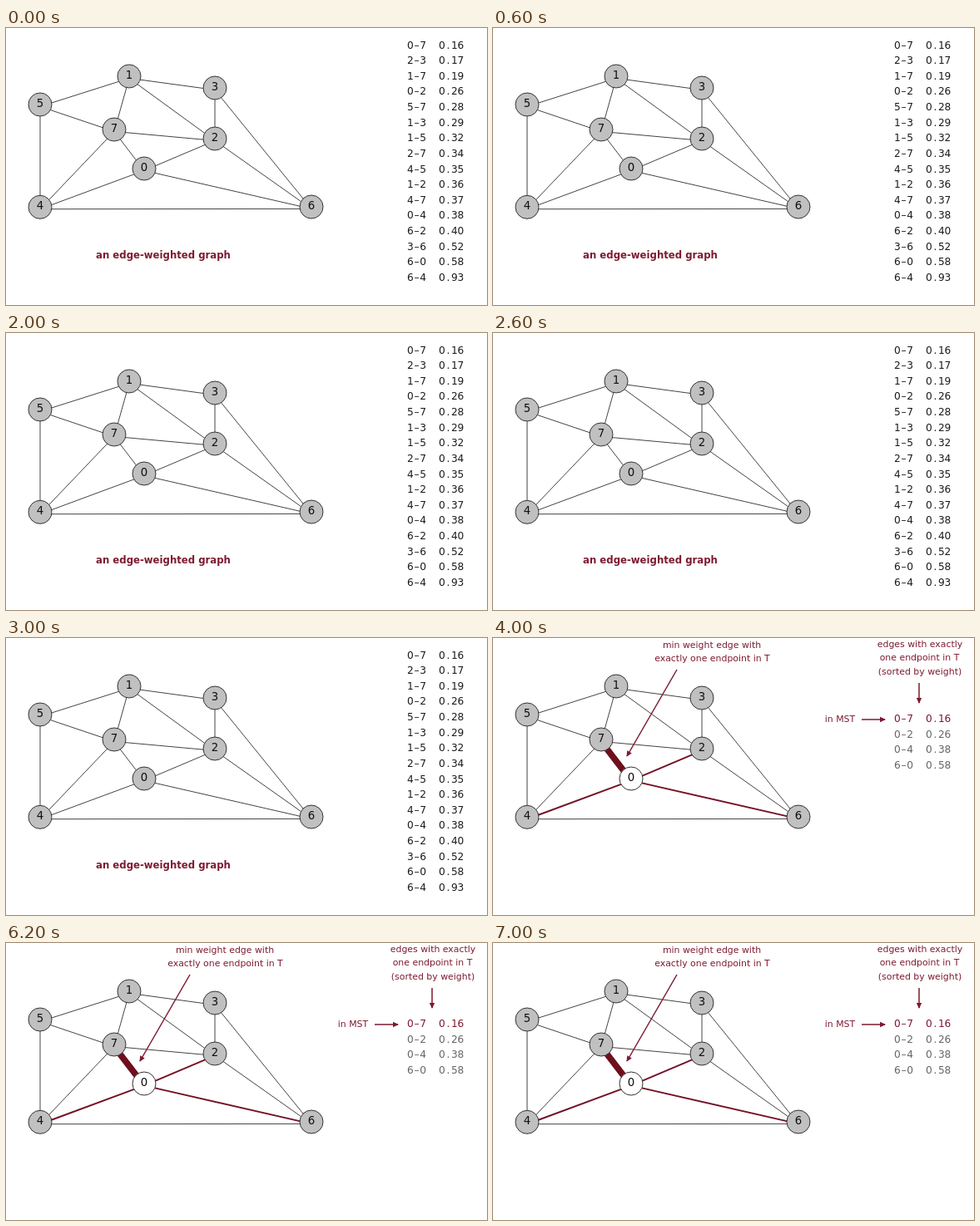
These frames come from a looping animation (578 px wide and 333 px high, 8 s). An HTML page:

```html
<!DOCTYPE html>
<html lang="en">
<head>
<meta charset="utf-8">
<title>Edge-weighted graph</title>
<style>
html, body { margin: 0; width: 100%; height: 100%; overflow: hidden; background: #fff; }
svg { display: block; width: 578px; height: 333px; }
text { font-family: "DejaVu Sans", sans-serif; text-anchor: middle; }
.edge { stroke: #444; stroke-width: 1; }
.cut { stroke: #741226; stroke-width: 2; }
.min { stroke: #6e0f1c; stroke-width: 7.5; }
.node { fill: #c0c0c0; stroke: #333; stroke-width: 1; }
.label { font-size: 13.3px; fill: #111; }
.row { font-size: 12.2px; fill: #1c1c1c; }
.dim { fill: #666; }
.red { fill: #7d1a30; }
.note { font-size: 10.92px; fill: #7d1a30; }
.caption { font-size: 11.7px; font-weight: bold; fill: #7d1a30; }
.arrow { stroke: #7d1a30; stroke-width: 1.5; }
</style>
</head>
<body>
<svg viewBox="0 0 578 333"></svg>
<script>
const LOOP = 8000, SWITCH = 4000;
const EDGE_DROP = 2.4; // edges meet slightly below the disc centres
const nodes = [[166, 169], [148, 58], [251, 133], [251, 72], [41, 215.3], [41, 92], [367, 215], [130, 122]];
const edges = `0-7 0.16,2-3 0.17,1-7 0.19,0-2 0.26,5-7 0.28,1-3 0.29,1-5 0.32,2-7 0.34,
4-5 0.35,1-2 0.36,4-7 0.37,0-4 0.38,6-2 0.40,3-6 0.52,6-0 0.58,6-4 0.93`
  .split(",").map(s => {
    const [pair, weight] = s.trim().split(" ");
    return { pair, weight, ends: pair.split("-") };
  });
const crossing = edges.filter(e => e.ends.includes("0"));

const text = (x, y, cls, str) => `<text x="${x}" y="${y}" class="${cls}">${str}</text>`;
const line = (a, b, cls) =>
  `<line x1="${a[0]}" y1="${a[1]}" x2="${b[0]}" y2="${b[1]}" class="${cls}"/>`;

// Characters sit on a monospaced grid.
function row(edge, y, cls) {
  const str = edge.pair.replace("-", "–") + "\u00a0\u00a0" + edge.weight;
  const xs = [...str].map((_, i) => (486 + i * 7.56).toFixed(1));
  return text(xs.join(" "), y, "row " + cls, str);
}

function arrow(a, b) {
  const angle = Math.atan2(b[1] - a[1], b[0] - a[0]) * 180 / Math.PI;
  return line(a, b, "arrow") +
    `<path class="red" d="M1 0L-6 -3.2L-6 3.2Z" transform="translate(${b}) rotate(${angle})"/>`;
}

function graph(inTree, edgeClass) {
  const lines = edges.map(e => line(...e.ends.map(i => nodes[i]), edgeClass(e)));
  const discs = nodes.map(([x, y], i) =>
    `<circle cx="${x}" cy="${y}" r="14" class="node"${inTree(i) ? ' style="fill:#fff"' : ""}/>` +
    text(x, y + 3, "label", i));
  return `<g transform="translate(0 ${EDGE_DROP})">${lines.join("")}</g>` + discs.join("");
}

const overview = graph(() => false, () => "edge") +
  edges.map((e, i) => row(e, 24.6 + i * 18.62, "")).join("") +
  text(189, 277, "caption", "an edge-weighted graph");

const firstStep = graph(i => i === 0,
    e => e === crossing[0] ? "min" : crossing.includes(e) ? "cut" : "edge") +
  crossing.map((e, i) => row(e, 101.4 + i * 18.4, i ? "dim" : "red")).join("") +
  text(263, 12, "note", "min weight edge with") +
  text(263.5, 28, "note", "exactly one endpoint in T") +
  text(513, 11, "note", "edges with exactly") +
  text(512.5, 27, "note", "one endpoint in T") +
  text(513, 43.6, "note", "(sorted by weight)") +
  text(417, 101, "note", "in MST") +
  arrow([221, 38], [161, 142]) + arrow([512, 54], [512, 78]) + arrow([443, 98], [471, 98]);

const svg = document.querySelector("svg");
svg.innerHTML = `<g>${overview}</g><g>${firstStep}</g>`;
const [before, after] = svg.children;

function draw(now) {
  const started = now % LOOP >= SWITCH;
  before.style.display = started ? "none" : "";
  after.style.display = started ? "" : "none";
}
const start = performance.now();
function tick() {
  draw(performance.now() - start);
  requestAnimationFrame(tick);
}
tick();
</script>
</body>
</html>
```
